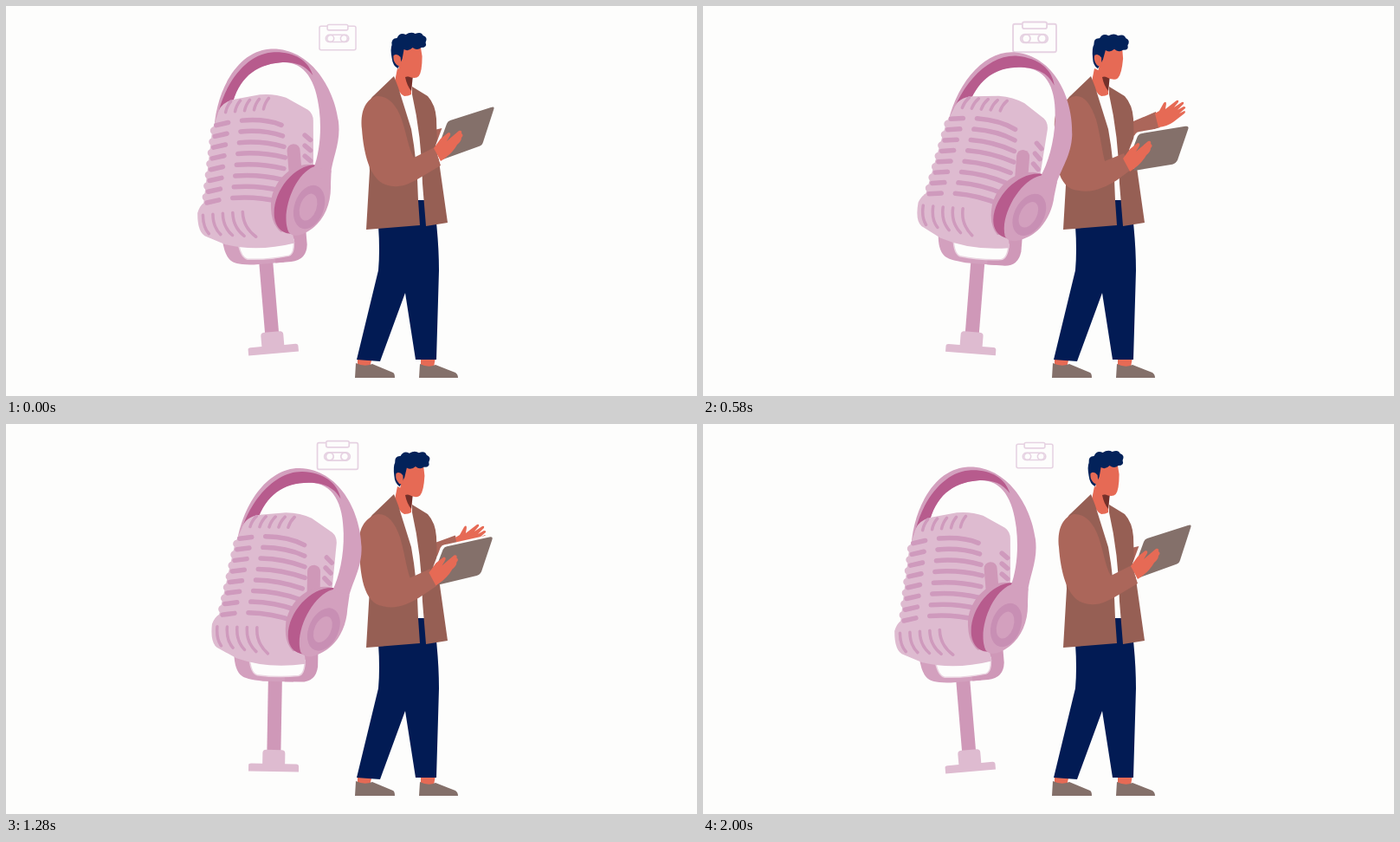
Animation of 798x450 px, one loop 2.03 s. Source, as an HTML page:

```html
<!DOCTYPE html>
<html lang="en">
<head>
<meta charset="utf-8">
<title>Podcast host</title>
<style>
  html, body { margin: 0; width: 100%; height: 100%; overflow: hidden; background: #fdfdfc; }
  svg { display: block; width: 100vw; height: 100vh; }
  .jacket { fill: #965f54; }
  .gray { fill: #84706a; }
  .skin { fill: #e66a55; }
  .navy { fill: #021b54; }
  .hair { fill: #03225a; }
  .white { fill: #fdfdfc; }
  .sleeve { fill: #ab665a; }
  .shell { fill: #debbd0; }
  .band { fill: #d3a0be; }
  .pink { fill: #cf98b8; }
  .plum { fill: #b75b8d; }
  .slots { fill: none; stroke: #cf9abd; stroke-linecap: round; }
  .icon { fill: none; stroke: #e6d2e2; stroke-width: 1.7; }
</style>
</head>
<body>
<svg viewBox="0 0 798 450">
  <g id="icon" class="icon">
    <path d="M-13 -15H-21Q-23 -15 -23 -13V13Q-23 15 -21 15H21Q23 15 23 13V-13Q23 -15 21 -15H13"/>
    <path d="M-11 -17H11Q13 -17 13 -15V-12Q13 -10 11 -10H-11Q-13 -10 -13 -12V-15Q-13 -17 -11 -17Z"/>
    <rect x="-15" y="-4" width="29" height="9" rx="4.5"/>
    <circle cx="-9" cy=".5" r="4.3"/>
    <circle cx="8" cy=".5" r="4.3"/>
  </g>

  <!-- legs -->
  <path class="skin" d="M406 405H423L420 417H406ZM479 405H496L494 417H479Z"/>
  <path class="gray" d="M404 412Q414 417 423 413L447 423Q449 424 449 429H403ZM478 413Q488 418 496 414L519 423Q522 425 522 429H477Z"/>
  <path class="navy" d="M430 254L497 250Q500 280 500 305L497 408H473L461 331L432 410L405 408L430 305Q432 282 430 254ZM474 222H485V256H474Z"/>

  <!-- far arm -->
  <path id="farArm" class="sleeve"/>
  <path id="farHand" class="skin" d="M522 124L527 121L532 112Q535 109 535 113L534 119L547 109Q550 108 549 111L544 117L553 111Q556 110 555 113L548 120L555 116Q558 116 557 118L550 124L556 121Q558 122 556 124L543 134Q536 139 526 140Z"/>

  <!-- torso -->
  <path class="white" d="M452 92L470 98L481 150L484 224H475L464 150Z"/>
  <path class="skin" d="M452 72L449 87Q453 101 460 104Q465 104 468 102L469 80Z"/>
  <path d="M461 82L470 80L468 98Q463 92 461 82Z" fill="#74302a"/>
  <path class="jacket" d="M448 81L425 103Q413 112 417 150L420 190L416 258L478 253L476 224Q475 180 468 142L453 94Z"/>
  <path class="jacket" d="M469 93L487 104Q496 114 497 130L498 165L510 250L485 254L481 205Q480 150 469 102Z"/>

  <g id="head">
    <path class="skin" d="M456 50L478 46L480 58Q480 76 476 81Q472 85 463 81L452 78Z"/>
    <path class="hair" d="M452 72Q446 69 445 60Q443 49 445 45Q444 37 451 37Q454 30 461 33Q467 29 472 32Q479 29 481 34Q487 36 484 42Q486 48 479 48Q474 52 469 48Q464 53 459 50L457 61Z"/>
    <path class="skin" d="M455 59Q451 54 447 57Q446 62 449 66Q452 71 456 68Z"/>
  </g>

  <!-- near arm and tablet -->
  <path id="edge" class="white" transform="translate(-3 -2)"/>
  <path id="tablet" class="gray"/>
  <path id="nearArm" class="sleeve"/>
  <path id="nearHand" class="skin" d="M494 164L502 153L511 146Q515 146 512 151L509 156L523 144Q527 143 526 147Q529 149 526 152Q526 156 521 160Q515 171 502 179Z"/>

  <g id="mic">
    <path class="pink" d="M301 292H317V378H301Z"/>
    <path class="shell" d="M280 401V394Q280 392 283 392H296V380Q296 376 300 376H318Q322 376 322 380V392H335Q338 392 338 395V401Z"/>
    <path class="band" d="M261 146C266 94 296 50.5 333 50.5C378 51 404 98 406 140C407 165 396 180 392 200L373 192C381 175 386 150 385 125C384 90 372 67 345 67C315 67 295 80 285 112L266 150Z"/>
    <path class="plum" d="M263 144C268 99 300 54.5 336 54.5C360 55 377 66 381 85C372 70 358 67 345 67C315 67 295 82 285 112L266 150Z"/>
    <path class="band" d="M261 266Q262 285 270 291Q274 295 295 297H330V270Z"/>
    <path class="pink" d="M320 290V297H338Q356 297 358 279V258H335Z"/>
    <path class="white" d="M279 272Q281 288 288 290Q312 293 336 290Q343 288 343 272Z" stroke="#ead3e0" stroke-width="1.5"/>
    <path class="shell" d="M267 122Q271 107 288 105L318 102Q335 102 348 108L372 124Q378 129 377 138L373 188L342 262L344 276Q300 283 264 271L241 259Q233 253 235 232Q238 224 243 221L260 138Z"/>
    <path id="bumps" fill="none" stroke="#debbd0" stroke-width="9" stroke-linecap="round"/>
    <path id="rows" class="slots" stroke-width="5.5"/>
    <path id="ribs" class="slots" stroke-width="3.5"/>
    <path class="pink" d="M344 200V169Q345 162 352 162Q359 163 359 170V195Z"/>
    <path class="pink" d="M374 188C348 181 321 205 320 233Q319 252 329 262L345 260Z"/>
    <path class="plum" d="M375 188C350 186 322 216 323 245C324 258 332 265 343 265L352 230Z"/>
    <path class="band" d="M373 190C350 197 330 240 338 263C343 270 352 268 360 264C378 256 390 236 391 212L393 196Z"/>
    <ellipse cx="364" cy="236" rx="17" ry="26" transform="rotate(24 364 236)" fill="#c88fb4"/>
    <ellipse class="band" cx="363" cy="236" rx="9.5" ry="16" transform="rotate(24 363 236)"/>
  </g>
</svg>
<script>
const el = id => document.getElementById(id);
const put = (id, d) => el(id).setAttribute('d', d);
const pose = (id, t) => el(id).setAttribute('transform', t);

// Microphone grille
let rows = '', bumps = '', ribs = '';
for (let i = 0; i < 8; i++) {
  const x = 288 - 2.6 * i, y = 131 + 12.6 * i;
  rows += `M${x - 23} ${y + 2}L${x - 9} ${y}M${x + 7} ${y - 1}q27 0 ${45 + Math.min(i, 3) * 3} 9`;
  if (i < 7) bumps += `M${x - 26} ${y + 8}h12`;
}
for (let i = 0; i < 3; i++) rows += `M${366 - i} ${153 + i * 12}l6 6`;
for (let i = 0; i < 5; i++) {
  ribs += `M${284 + 11 * i} 107q-5 5 -7 12`;
  ribs += `M${241 + 11.5 * i} 235q-1 ${14 + i} ${5 + 2 * i} ${22 + 2 * i}`;
}
put('rows', rows);
put('bumps', bumps);
put('ribs', ribs);

// Start and end shapes of the parts that bend
const shapes = {
  farArm: [
    'M490 144L512 139L518 156L490 158Z',
    'M490 136L523 122L528 140L490 152Z'],
  tablet: [
    'M513 132L560 117Q565 115 563 120L551 157Q550 161 546 162L502 178L499 163L509 136Q510 133 513 132Z',
    'M507 147L557 139Q562 138 560 143L548 178Q546 182 542 183L498 190L495 168L502 150Q504 147 507 147Z'],
  nearArm: [
    'M428 104C414 108 409 124 411 142C413 170 420 199 438 206C452 211 462 207 475 200L502 184L495 163L471 175C465 165 463 149 457 131C451 113 440 103 428 104Z',
    'M430 104C413 108 405 122 406 140C406 175 408 212 434 213C450 216 465 209 478 201L494 189L486 170L464 179C461 168 459 150 454 131C448 113 440 103 430 104Z']
};
shapes.edge = shapes.tablet;

const number = /\d+/g;
function mix([a, b], p) {
  const ends = b.match(number);
  let i = 0;
  return a.replace(number, n => (+n + (ends[i++] - n) * p).toFixed(2));
}

const LOOP = 2030, SWING = LOOP / 2, MOVE = 490;
function sway(time) {
  const t = time % SWING;
  const u = Math.min(1, Math.min(t, SWING - t) / MOVE);
  return u < 0.5 ? 4 * u ** 3 : 1 - 4 * (1 - u) ** 3;
}

function draw(now) {
  const p = sway(now % LOOP), q = 1 - p;
  for (const id in shapes) put(id, mix(shapes[id], p));
  pose('mic', `rotate(${9.4 * p - 4.8} 309 400)`);
  pose('icon', `translate(383 37) scale(${(42 + 8 * p) / 46})`);
  pose('head', `translate(${0.6 + 0.5 * p} ${p}) rotate(${5 * p} 462 105)`);
  pose('nearHand', `translate(${-9 * p} ${12 * p})`);
  pose('farHand', `translate(${-8 * q} ${18 * q})`);
}

const start = performance.now();
function tick() {
  draw(performance.now() - start);
  requestAnimationFrame(tick);
}
tick();
</script>
</body>
</html>
```
